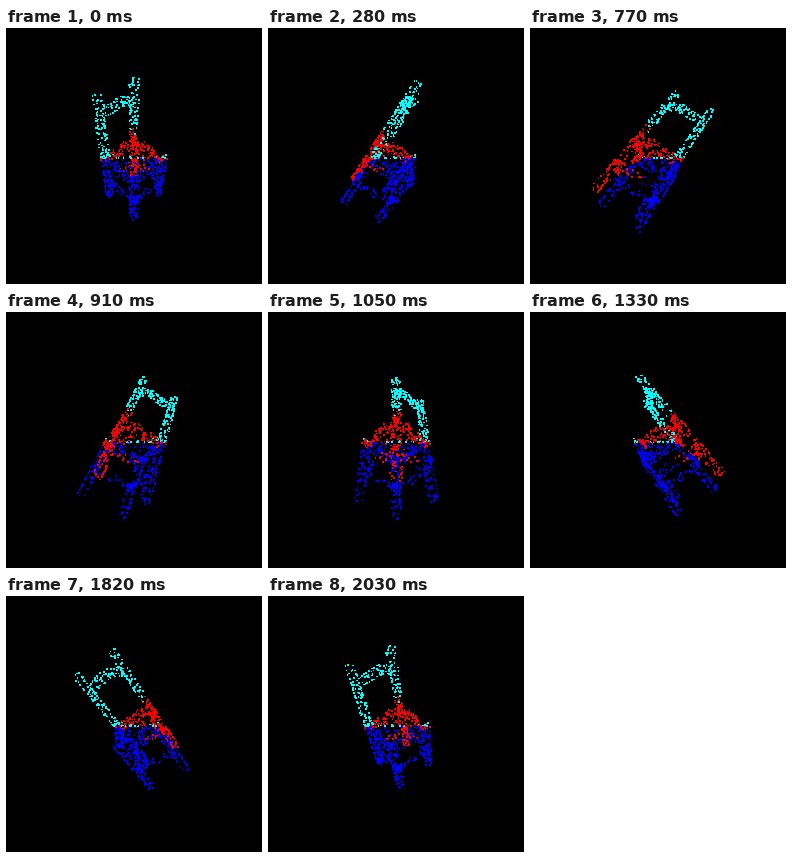
A matplotlib script for the animation above (2100 ms loop, 256 px wide and 256 px high).

```python
import numpy as np
import matplotlib.pyplot as plt
from matplotlib.animation import FuncAnimation

SIZE, FRAMES, LOOP_MS = 256, 30, 2100
FOCAL = SIZE / 2 / np.tan(np.radians(30))   # 60 degree field of view
TOP, SEAT, CORNER = 67, 0, 20.5
ROOT2 = np.sqrt(2)

rng = np.random.default_rng(11)


def box(n, a, b, u):
    """Random points on the surface of a box, weighted by face area."""
    lo, hi = np.array([a, b, u], float).T
    size = hi - lo
    area = size.prod() / size
    pts = lo + rng.random((n, 3)) * size
    axis = rng.choice(3, n, p=area / area.sum())
    side = rng.integers(0, 2, n)
    pts[np.arange(n), axis] = np.where(side, hi[axis], lo[axis])
    return pts


def around(c, half):
    return c - half, c + half


def rails(n, half, u):
    """Four bars joining the corner posts."""
    span = (-CORNER, CORNER)
    bars = []
    for sign in (-1, 1):
        edge = around(sign * CORNER, half)
        bars += [box(n, span, edge, u), box(n, edge, span, u)]
    return bars


def chair():
    """Points in the chair's own axes: two seat sides and up."""
    parts = []
    for a in (-1, 1):
        for b in (-1, 1):
            foot = around(a * CORNER, 3.3), around(b * CORNER, 3.3)
            parts.append(box(85, *foot, (-TOP, SEAT + 1)))
            if b > 0:
                parts.append(box(86, *foot, (SEAT, TOP)))
    parts += rails(30, 2, (-41, -35))
    parts += rails(48, 2.6, (-9, SEAT))
    parts.append(box(90, (-20, 20), (-20, 20), (-4, SEAT)))
    bar = box(64, (-18, 18), around(CORNER, 2.2), (40, 50))
    bar[:, 2] += 6 * (1 - (bar[:, 0] / 18) ** 2)
    parts.append(bar)
    return np.vstack(parts)


# Turn the seat by 45 degrees, then tip the chair by 45 degrees.
a, b, u = chair().T
d, w = (a + b) / ROOT2 - 0.5, (a - b) / ROOT2
s, z = (u - d) / ROOT2, (u + d) / ROOT2

# Three regions meeting along the tilt axis.
upper = (u > d / 3 - 1) & (z > -2.5)
middle = ~upper & (z > -3 + 0.43 * s) & (d > -2)
colors = np.zeros((len(z), 4))
colors[:] = (0, 0, 1, 1)
colors[middle] = (1, 0, 0, 1)
colors[upper] = (0, 1, 1, 1)

fig = plt.figure(figsize=(4, 4), dpi=SIZE / 4, facecolor="black")
ax = fig.add_axes([0, 0, 1, 1])
ax.set(xlim=(0, SIZE), ylim=(SIZE, 0))
ax.axis("off")
dots = ax.scatter(s, z, s=3.6, marker="s", linewidths=0, antialiased=False)


def draw(i):
    t = 2 * np.pi * i / FRAMES
    x = w * np.cos(t) + s * np.sin(t)
    near = s * np.cos(t) - w * np.sin(t)
    k = FOCAL / (FOCAL - near)
    order = np.argsort(near)
    xy = np.column_stack([SIZE / 2 + x * k, SIZE / 2 - z * k])
    dots.set_offsets(xy[order])
    dots.set_facecolors(colors[order])
    return (dots,)


anim = FuncAnimation(fig, draw, frames=FRAMES, interval=LOOP_MS / FRAMES,
                     repeat=True, repeat_delay=0)
plt.show()
```
